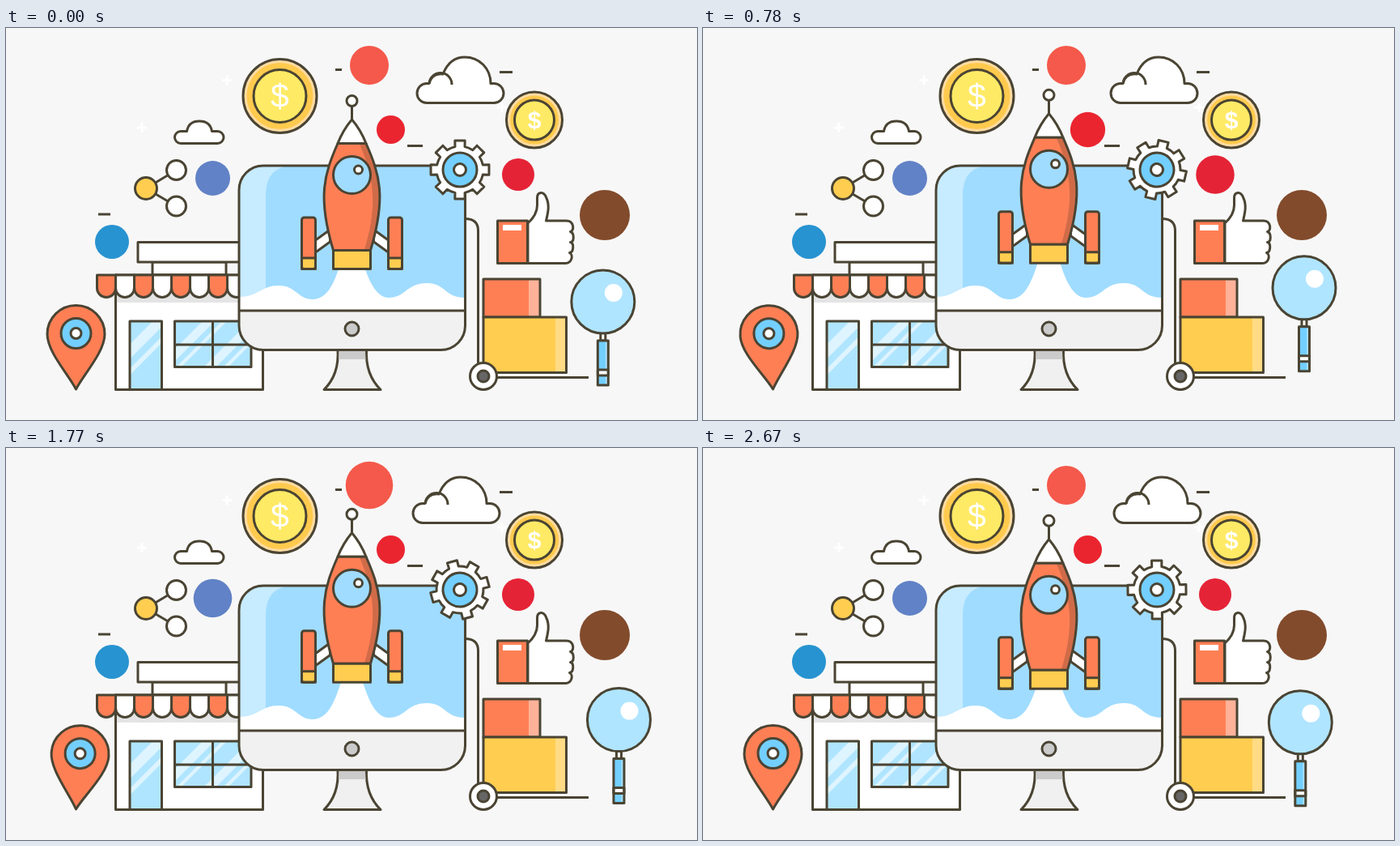
An HTML page with a canvas for the animation above (2.7 s loop, 854 by 484 pixels).

```html
<!DOCTYPE html>
<html lang="en">
<head>
<meta charset="utf-8">
<title>Launch illustration</title>
<style>
html, body { margin: 0; width: 100%; height: 100%; overflow: hidden; background: #f7f7f7; }
canvas { display: block; }
</style>
</head>
<body>
<canvas id="stage" width="854" height="484"></canvas>
<script>
const ctx = document.getElementById('stage').getContext('2d');
const LOOP = 2700, STEP = 30, TAU = Math.PI * 2;
const INK = '#4a4433', ORANGE = '#ff7f55', YELLOW = '#ffcd50', SKY = '#a0dcff',
      BLUE = '#73cfff', GLASS = '#b0e5ff', WHITE = '#fff';

// Drawing helpers
function paint(path, fill, stroke = INK, width = 3) {
  if (fill) { ctx.fillStyle = fill; ctx.fill(path); }
  if (stroke) { ctx.strokeStyle = stroke; ctx.lineWidth = width; ctx.stroke(path); }
}
const shape = (d, fill, stroke, width) => paint(new Path2D(d), fill, stroke, width);
function circle(x, y, r, fill, stroke, width) {
  const p = new Path2D();
  p.arc(x, y, r, 0, TAU);
  paint(p, fill, stroke, width);
}
function box(x, y, w, h, fill, stroke, radius = 0) {
  const p = new Path2D();
  p.roundRect(x, y, w, h, radius);
  paint(p, fill, stroke);
}
function group(draw, x = 0, y = 0, degrees = 0) {
  ctx.save();
  ctx.translate(x, y);
  ctx.rotate(degrees * Math.PI / 180);
  draw();
  ctx.restore();
}
function clipped(path, draw) {
  ctx.save();
  ctx.clip(path);
  draw();
  ctx.restore();
}

// Motion helpers
function keyed(t, keys) {
  if (t <= keys[0][0]) return keys[0][1];
  for (let i = 1; i < keys.length; i++) {
    const [t0, a] = keys[i - 1], [t1, b] = keys[i];
    if (t < t1) return a + (b - a) * (1 - Math.cos(Math.PI * (t - t0) / (t1 - t0))) / 2;
  }
  return keys[keys.length - 1][1];
}
const bump = (t, start, length) =>
  t > start && t < start + length ? Math.sin(Math.PI * (t - start) / length) : 0;
const wiggle = (t, start, length) =>
  t > start && t < start + length ? -Math.sin(TAU * (t - start) / length) : 0;

// x, y, radius, growth, first pulse, colour
const badges = [
  [449, 46, 24, 6, 385, '#f4594b'],
  [255.5, 185.5, 21.5, 4.5, 215, '#6182c6'],
  [131, 264, 21, 5.5, 65, '#2793d0'],
  [475.5, 125.5, 17.5, 4.2, 585, '#ea2530'],
  [633, 181, 20, 5, 685, '#e52336'],
  [740, 231, 31, 8, 835, '#824b2c']
];
function drawBadges(t) {
  for (const [x, y, r, grow, start, color] of badges) {
    const pulse = bump(t, start, 350) + bump(t, start + 1265, 350);
    circle(x, y, r + grow * pulse, color, null);
  }
}

function pane(x, y, w, h, stripes) {
  const p = new Path2D();
  p.rect(x, y, w, h);
  paint(p, GLASS, null);
  clipped(p, () => {
    for (const [sx, sw] of stripes)
      shape(`M${x + sx} ${y + h}l${h} ${-h}h${sw}l${-h} ${h}Z`, '#def4ff', null);
  });
  paint(p);
}

function drawStore() {
  box(181, 289, 91, 16, WHITE);
  box(163, 264.5, 140, 24.5, WHITE);
  box(135.5, 305, 182, 141.5, WHITE);
  box(137, 307, 179, 32, '#e4e4e4', null);
  for (let i = 0; i < 8; i++)
    shape(`M${112.5 + i * 23} 305h23v16a11.5 11.5 0 0 1 -23 0Z`, i % 2 ? WHITE : ORANGE);
  pane(153, 362, 39.5, 84.5, [[-56, 18], [-26, 8]]);
  pane(208.5, 362, 94.5, 56.5, [[-22, 15], [2, 6], [36, 15], [60, 6]]);
  shape('M255.5 362V418M208.5 391H303');
}

function drawTrolley() {
  shape('M567 235.5Q583.5 235.5 583.5 250V416');
  shape('M604 431.5H720');
  box(590, 310, 70, 47, ORANGE, null);
  box(646, 311, 13, 46, '#ffb299', null);
  box(590, 310, 70, 47);
  box(590, 357, 102.5, 68.5, YELLOW, null);
  box(679, 358, 12, 66, '#ffdb85', null);
  box(590, 357, 102.5, 68.5);
  circle(590, 430, 16.5, WHITE);
  circle(590, 430, 7, '#666');
}

function drawMonitor() {
  shape('M410 397Q412 428 393 446.5H463Q444 428 445.5 397Z', '#f0f0f0');
  shape('M411.5 399H444L444.5 409H411Z', '#cbcbcb', null);
  const frame = new Path2D();
  frame.roundRect(288, 170, 279.5, 227.5, 30);
  paint(frame, SKY, null);
  clipped(frame, () => {
    shape('M288 170H356Q321 170 321 206V349H288Z', '#c7ebff', null);
    shape('M288 332C312 332 315 318 337 318C359 318 360 335 379 335C397 335 405 315 411 298' +
      'L416 284H439L444 298C450 315 459 333 473 333C494 333 495 315 520 315' +
      'C544 315 541 333 568 333V349H288Z', WHITE, null);
    box(286, 349, 284, 60, '#f1f1f1');
  });
  paint(frame);
  circle(427.5, 371.5, 8.5, '#cbcbcb');
}

function drawRocketSide() {
  shape('M-45 262L-27 249V264L-45 277Z', WHITE);
  box(-62, 234, 17, 63.5, ORANGE, null, 3);
  box(-62, 284, 17, 13.5, YELLOW);
  box(-62, 234, 17, 63.5, null, INK, 3);
}
function drawRocket() {
  drawRocketSide();
  ctx.save();
  ctx.scale(-1, 1);
  drawRocketSide();
  ctx.restore();
  shape('M0 96V114');
  circle(0, 90, 6.5, WHITE);
  shape('M0 113Q-11 126 -17.5 142.5H17.5Q11 126 0 113Z', WHITE);
  const body = new Path2D('M-17.5 142.5C-34 180 -43 208 -23 274.5H23C43 208 34 180 17.5 142.5Z');
  paint(body, ORANGE, null);
  clipped(body, () =>
    shape('M9 142C25 180 34 214 15 275H50V142Z', '#d06b48', null));
  paint(body);
  box(-23, 274.5, 46, 23, YELLOW);
  circle(0, 181.5, 23, SKY);
  circle(8, 175, 5, WHITE);
}

function drawGear() {
  const p = new Path2D();
  for (let i = 0; i < 8; i++) {
    const a = i * TAU / 8;
    for (const [r, da] of [[29, -0.21], [36.5, -0.17], [36.5, 0.17], [29, 0.21]])
      p.lineTo(r * Math.sin(a + da), -r * Math.cos(a + da));
    p.arc(0, 0, 29, a + 0.21 - TAU / 4, a + TAU / 8 - 0.21 - TAU / 4);
  }
  p.closePath();
  paint(p, WHITE);
  circle(0, 0, 21, BLUE);
  circle(0, 0, 7.5, WHITE);
}

function drawCoin(x, y, r, inner, font) {
  circle(x, y, r, '#ffdca2');
  circle(x, y, r - 4.5, '#ffca4d', null);
  circle(x, y, inner, '#ffea66');
  ctx.font = font;
  ctx.fillStyle = WHITE;
  ctx.textAlign = 'center';
  ctx.fillText('$', x, y + inner * 0.42);
}

function drawShare() {
  shape('M37.5 -22.5L0 0L37.5 22');
  circle(0, 0, 13.5, YELLOW);
  circle(37.5, -22.5, 12, WHITE);
  circle(37.5, 22, 12, WHITE);
}

function drawPin() {
  shape('M0 0C-9 -18 -35.5 -46 -35.5 -68A35.5 35.5 0 0 1 35.5 -68C35.5 -46 9 -18 0 0Z', ORANGE);
  circle(0, -69, 18.5, BLUE);
  circle(0, -69, 6.5, WHITE);
}

function drawThumb() {
  box(0, -53, 37, 52.5, ORANGE);
  box(6.5, -48, 23, 7, WHITE, null);
  shape('M37.5 -.5V-50C43 -55 49 -63 49 -72V-81C49 -89 57 -90 60 -82C65 -72 62 -62 60 -53' +
    'H85C95 -53 95 -40 90 -39.5C95 -38 95 -27 90 -26.5C95 -25 94 -14 89 -13.5C94 -11 92 -.5 84 -.5Z', WHITE);
}

function drawLens() {
  box(-3, 38, 6, 10, WHITE);
  box(-6.5, 48, 13, 55, BLUE, null);
  box(3, 50, 3, 52, '#a8e0ff', null);
  box(-6.5, 84, 13, 7, WHITE);
  box(-6.5, 48, 13, 55);
  circle(0, 0, 39, GLASS);
  circle(13, -11, 11, WHITE, null);
}

function drawBigCloud() {
  shape('M520 92.5A12 12 0 0 1 520 68.5H523C525 60 531 56 540 57C546 42 555 36 567 36' +
    'C585 36 599 50 599 68.5H603A12 12 0 0 1 603 92.5Z', WHITE);
  shape('M523 69A14 14 0 0 1 551 70');
}
function drawSmallCloud() {
  shape('M216 142.5A7.5 7.5 0 0 1 216 127.5H223.5C225 119 231 115 239 115' +
    'C247 115 253 119 254.5 127.5H261.5A7.5 7.5 0 0 1 261.5 142.5Z', WHITE);
}

function drawMarks() {
  for (const [x, y] of [[273, 64.5], [168, 123], [613, 98]])
    shape(`M${x - 6} ${y}h12M${x} ${y - 6}v12`, null, WHITE);
  shape('M407 51.5h8M610 54.5h16M496 145.5h19M114 230h15');
}

function render(t) {
  const phase = t / LOOP;
  ctx.fillStyle = '#f7f7f7';
  ctx.fillRect(0, 0, 854, 484);
  drawMarks();
  drawStore();
  drawTrolley();
  drawMonitor();
  drawCoin(338.5, 84, 45.5, 32.5, '41px "Liberation Sans", Arial, sans-serif');
  group(drawBigCloud, -3.2 * (1 - Math.cos(TAU * phase)));
  drawCoin(653, 113.5, 34.5, 24.5, 'bold 30px "Liberation Sans", Arial, sans-serif');
  drawSmallCloud();
  group(drawRocket, 427.5, -9.6 * Math.sin(Math.PI * phase) ** 1.2);
  group(drawGear, 561, 175, 45 * phase);
  group(drawShare, 173, 198, 4.6 * wiggle(t, 1040, 440));
  group(drawPin, 86.5, 446, keyed(t, [[400, 0], [950, -5.4], [1630, 5.4], [2090, 0]]));
  group(drawThumb, 607.5, 291, 5 * wiggle(t, 1890, 480));
  const orbit = TAU * (phase + 145 / 360);
  group(drawLens, 747 + 11.2 * Math.cos(orbit), 331.5 + 11.5 * Math.sin(orbit));
  drawBadges(t);
}

ctx.lineJoin = 'round';
const begin = performance.now();
function tick() {
  const t = (performance.now() - begin) % LOOP;
  render(Math.floor(t / STEP) * STEP);
  requestAnimationFrame(tick);
}
tick();
</script>
</body>
</html>
```
